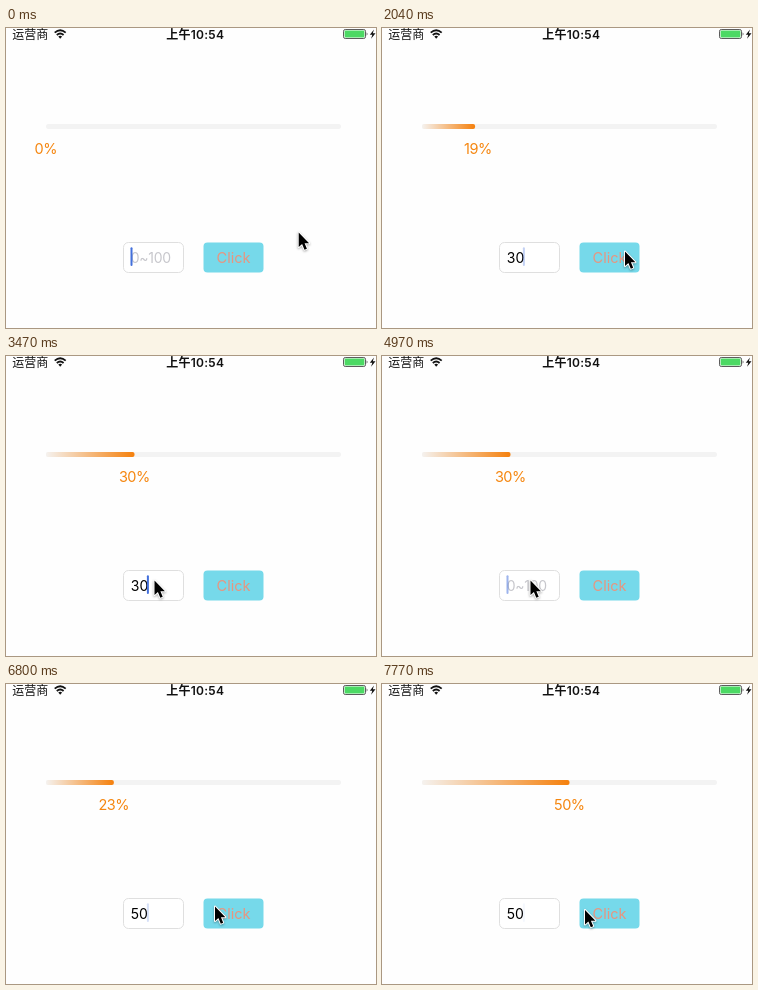
These frames come from a looping animation (370x300 px, 8000 ms). An HTML page:

```html
<!DOCTYPE html>
<html lang="zh">
<head>
<meta charset="utf-8">
<title>Progress bar</title>
<style>
  html, body { margin: 0; width: 100%; height: 100%; overflow: hidden; background: #fefefe; }
  svg { display: block; width: 370px; height: 300px; }
  text { font-family: Inter, "Noto Sans CJK SC", "Noto Sans CJK", sans-serif; font-size: 14px; }
  .status { font-size: 12px; fill: #111; }
  .clock { font-weight: 600; text-anchor: middle; letter-spacing: .25px; }
  #label { font-size: 14.5px; letter-spacing: -.5px; fill: #f5860f; text-anchor: middle; }
  #hint { fill: #c7c7cc; letter-spacing: -.25px; }
  .click { font-size: 14.5px; fill: #e8957f; text-anchor: middle; }
  #mouse { paint-order: stroke; filter: drop-shadow(0 1px 1px #0005); }
</style>
</head>
<body>
<svg viewBox="0 0 370 300">
  <defs>
    <linearGradient id="glow">
      <stop offset="0" stop-color="#f5f2ef"/>
      <stop offset="1" stop-color="#f5800c"/>
    </linearGradient>
  </defs>

  <!-- status bar -->
  <text class="status" x="6.2" y="10.6">运营商</text>
  <g fill="none" stroke="#111" stroke-width="1.8">
    <path d="M48.7 4.6Q54.2-.2 59.7 4.6M50.8 7Q54.2 4 57.6 7"/>
    <path d="M54.2 10.7L52.3 8.6Q54.2 7.1 56.1 8.6Z" fill="#111" stroke="none"/>
  </g>
  <text class="status clock" x="189.2" y="10.6">上午10:54</text>
  <rect x="337.5" y="1.5" width="22" height="9" rx="1.8" fill="#fefefe" stroke="#333" stroke-width=".8"/>
  <rect x="338.6" y="2.6" width="19.8" height="6.8" rx=".8" fill="#4cd964"/>
  <path d="M360.7 4.2Q362.4 6 360.7 7.8Z" fill="#333"/>
  <path d="M368 1.4L363.8 6.7H366.3L365.1 10.8L369.5 5.2H366.8Z" fill="#111"/>

  <!-- progress -->
  <rect x="40" y="96" width="295" height="5" rx="2.2" fill="#f3f3f3"/>
  <rect id="fill" x="40" y="96" width="0" height="5" rx="2" fill="url(#glow)"/>
  <text id="label" y="125.7"></text>

  <!-- input and button -->
  <rect x="117.5" y="214.5" width="60" height="30" rx="5" fill="#fff" stroke="#dcdcdc" stroke-width=".9"/>
  <text id="hint" x="124.7" y="234.6">0~100</text>
  <text id="typed" x="124.8" y="234.6" fill="#000"></text>
  <rect id="caret" y="219.3" width="2" height="18.7" rx="1" fill="#4370dc"/>
  <rect x="197.5" y="214.5" width="60" height="30" rx="4" fill="#76d9ea"/>
  <text class="click" x="227.5" y="234.9">Click</text>

  <path id="mouse" d="M0 0V14.6L3.4 11.6L5.8 17.2L8.2 16.2L5.9 10.7H10.4Z"
    fill="#000" stroke="#fff" stroke-width="2" stroke-linejoin="round"/>
</svg>
<script>
  const LOOP = 8000, FADE = 190;
  const $ = id => document.getElementById(id);
  const [fill, label, hint, typed, caret, mouse] =
    ['fill', 'label', 'hint', 'typed', 'caret', 'mouse'].map($);

  const edits = [
    { at: 0, text: '' }, { at: 390, text: '3' }, { at: 480, text: '30' },
    { at: 3350, text: '30' }, // tap into the field
    { at: 4170, text: '3' }, { at: 4320, text: '' },
    { at: 5110, text: '5' }, { at: 5260, text: '50' }
  ];
  const runs = [
    { at: 1388, step: 34.2, goal: 30 },
    { at: 6121, step: 29.2, goal: 50 }
  ];
  const home = { x: 292.7, y: 204.5 };
  const moves = [
    { at: 690, time: 490, x: 243, y: 223.5, sag: 16 },
    { at: 2970, time: 480, x: 148.5, y: 224.5, sag: 4 },
    { at: 5290, time: 480, x: 209, y: 222.5, sag: 3 },
    { at: 7600, time: 150, x: 203, y: 226, sag: 0 }
  ];

  const clamp = (v, max = 1) => Math.max(0, Math.min(max, v));
  const smooth = u => u * u * (3 - 2 * u);
  const latest = (list, t) => list.filter(e => e.at <= t).pop();

  // Solid after an edit, then a short pulse once a second.
  function caretOpacity(age) {
    if (age < 940) return 1 - clamp(age / FADE);
    const phase = (age - 940) % 1000;
    return clamp(Math.min(phase, 3 * FADE - phase) / FADE);
  }

  function mouseAt(t) {
    let { x, y } = home, sag = 0;
    for (const m of moves) {
      const u = smooth(clamp((t - m.at) / m.time));
      x += (m.x - x) * u;
      y += (m.y - y) * u;
      sag += m.sag * Math.sin(Math.PI * u);
    }
    return [x, y + sag];
  }

  function draw(t) {
    const run = latest(runs, t);
    const percent = lag => run ? Math.floor(clamp((t - run.at) / run.step - lag, run.goal)) : 0;
    label.textContent = percent(0) + '%';
    label.setAttribute('x', 39.8 + percent(0) * 2.95);
    fill.setAttribute('width', percent(.15) * 2.95);

    const edit = latest(edits, t);
    typed.textContent = edit.text;
    hint.style.display = edit.text ? 'none' : '';
    caret.setAttribute('x', 124.5 + edit.text.length * 8.2);
    caret.setAttribute('opacity', caretOpacity(t - edit.at - 560));

    mouse.setAttribute('transform', `translate(${mouseAt(t)})`);
  }

  const start = performance.now();
  function tick() {
    draw((performance.now() - start) % LOOP);
    requestAnimationFrame(tick);
  }
  tick();
</script>
</body>
</html>
```
